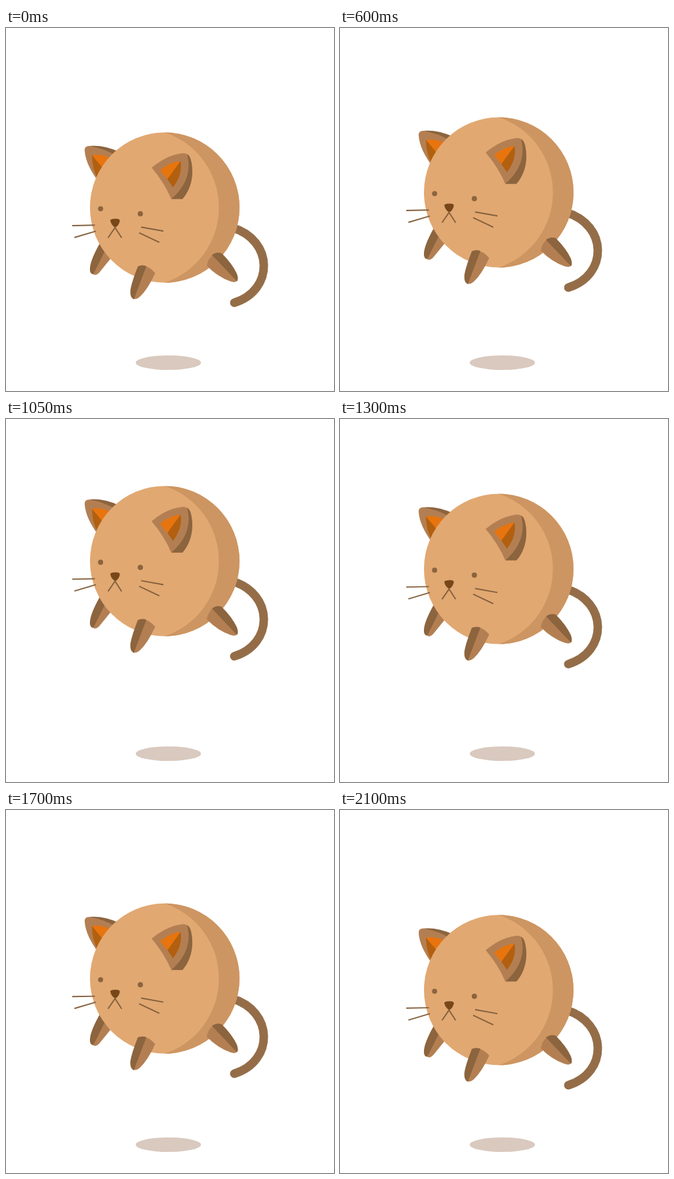
An HTML page for the animation above (2.15 s loop, 500 by 551 pixels).

```html
<!DOCTYPE html>
<html lang="en">
<head>
<meta charset="utf-8">
<title>Floating cat</title>
<style>
  html, body { margin: 0; width: 100%; height: 100%; overflow: hidden; background: #fff; }
  svg { display: block; width: 500px; height: 551px; }
  .fur { fill: #e1a872; }
  .shade { fill: #cd9561; }
  .mid { fill: #b37f52; }
  .dark { fill: #8c643e; }
  .orange { fill: #e8740e; }
  .rust { fill: #b2600f; }
  .line { fill: none; stroke: #84603d; stroke-width: 1.9; }
</style>
</head>
<body>
<svg viewBox="0 0 500 551">
  <ellipse cx="247.5" cy="508" rx="49.7" ry="11" fill="#d9c9be"/>
  <g id="cat">
    <path d="M345 303C408 322 409 398 348 417" fill="none" stroke="#946d48" stroke-width="13" stroke-linecap="round"/>

    <!-- far ear -->
    <path class="mid" d="M140 232C129 217 121 201 120 187Q119 179 127 179Q150 181 172 191L160 232Z"/>
    <path class="dark" d="M127 179Q148 177 173 188L168 194Q150 183 127 179Z"/>
    <path class="orange" d="M131 193Q146 190 162 199L146 218Z"/>
    <path class="rust" d="M131 193L148 213L141 231Q131 214 131 193Z"/>

    <!-- far leg -->
    <path class="mid" d="M150 318L133 374Q138 377 144 369L166 342Z"/>
    <path class="dark" d="M148 318Q129 350 128 364Q127 373 133 374L158 324Z"/>

    <!-- body -->
    <circle class="fur" cx="242" cy="272.5" r="114"/>
    <path class="shade" d="M242 158.5A114 114 0 0 1 242 386.5A120 120 0 0 0 242 158.5Z"/>

    <!-- near ear -->
    <path class="mid" d="M222 212Q246 192 270 190Q278 190 281 198C288 219 283 244 269 259.5L252 259.5Q241 234 222 212Z"/>
    <path class="dark" d="M276 191.500Q280 193 282 201C287 223 282 245 269 259.500L252 259.500C271 243 284 221 276 191.500Z"/>
    <path class="orange" d="M235 216Q249 204 266 202L247 231Z"/>
    <path class="rust" d="M266 202Q270 222 254.500 242L246 229.500Z"/>

    <!-- near legs -->
    <path class="mid" d="M201 362Q214 357 227.500 372Q216 397 204 408Q198 413 193 411Z"/>
    <path class="dark" d="M201 362Q207 359 214 361.500L195 411.500Q189 410 189.500 399Q191 387 201 362Z"/>
    <path class="mid" d="M306 361Q308 349 317 343L352 384Q349 387 342 384.500Q323 378 306 361Z"/>
    <path class="dark" d="M314 344.500Q321 339 329 342Q345 358 352 373Q355 382 352 384.500Z"/>

    <!-- face -->
    <circle class="dark" cx="144.200" cy="274.300" r="3.900"/>
    <circle class="dark" cx="204.800" cy="282" r="4"/>
    <path d="M159 292Q159 290.500 163 289.800Q174 288.500 173.500 293Q172 300 166.500 303Q160 299 159 292Z" fill="#774719"/>
    <path class="line" d="M155.500 318.500L166.200 303L176.300 318.500"/>
    <path class="line" d="M101 300L135.500 299.300M104.300 318L137 308.300M206 302.200L240 308.300M203 310.800L233.700 325.300"/>
  </g>
</svg>
<script>
  const LOOP = 2150, STEP = 50, PEAK = 1100;
  const TOP = -61.3, REST = 1.2;
  const cat = document.getElementById("cat");

  // Progress at x of a cubic Bezier with handles (x1, 0) and (1, 1).
  function easeIn(x, x1) {
    let lo = 0, hi = 1;
    for (let i = 0; i < 30; i++) {
      const u = (lo + hi) / 2, v = 1 - u;
      if (3 * x1 * u * v * v + 3 * u * u * v + u * u * u < x) lo = u;
      else hi = u;
    }
    return lo * lo * (3 - 2 * lo);
  }

  function height(t) {
    if (t <= PEAK) return TOP * easeIn(t / PEAK, 0.4);
    const left = (LOOP - t) / (LOOP - PEAK);
    return REST + (TOP - REST) * easeIn(left, 0.32);
  }

  const start = performance.now();
  function draw() {
    const t = (performance.now() - start) % LOOP;
    const y = height(Math.floor(t / STEP) * STEP);
    cat.setAttribute("transform", `translate(0 ${y.toFixed(2)})`);
    requestAnimationFrame(draw);
  }
  draw();
</script>
</body>
</html>
```
